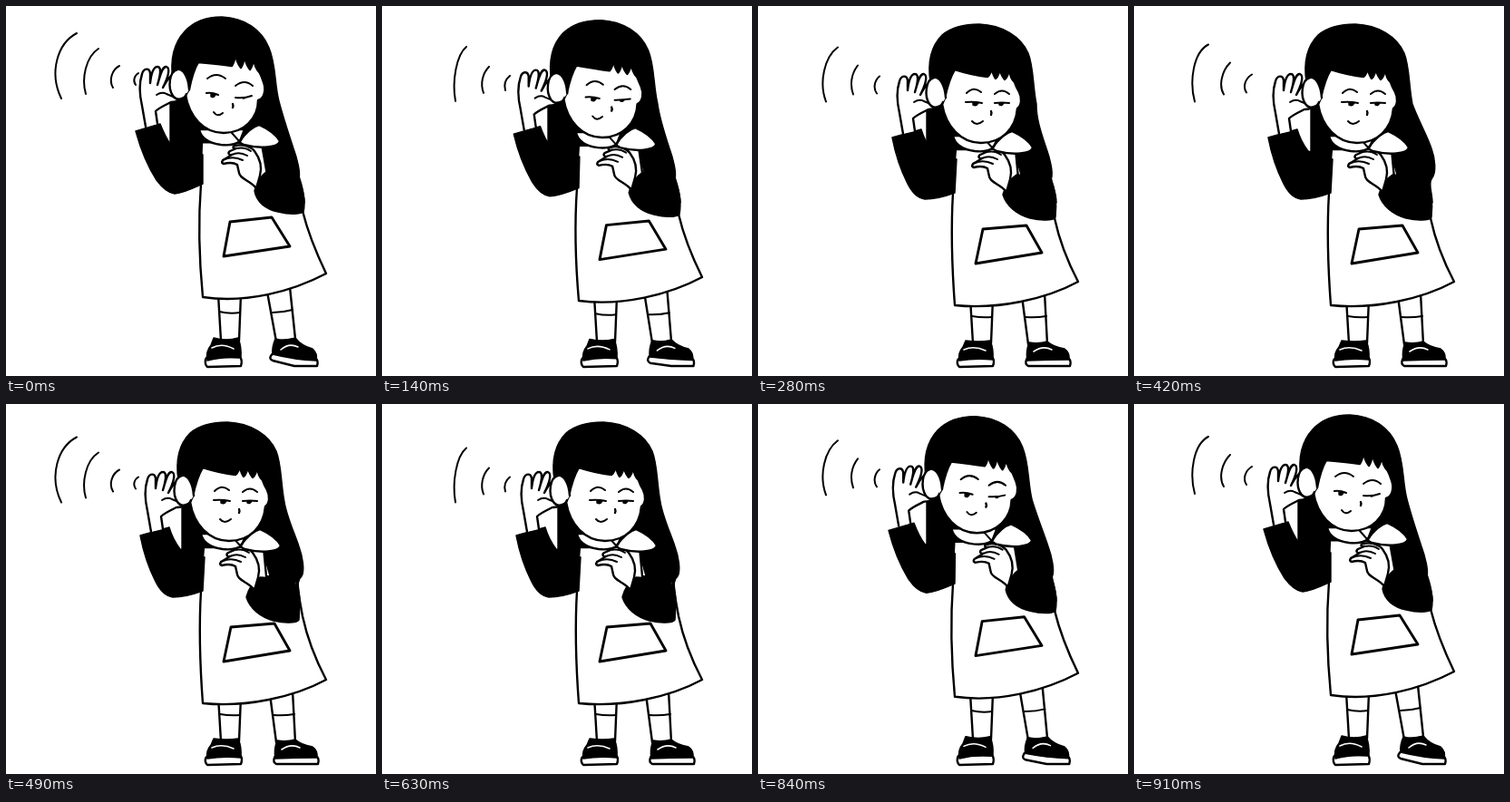
Animation, 408 px wide and 408 px high, one loop 0.98 s. Source, as an HTML page:

```html
<!DOCTYPE html>
<html lang="en">
<head>
<meta charset="utf-8">
<title>Listening girl</title>
<style>
html, body { margin: 0; width: 100%; height: 100%; overflow: hidden; background: #fff; }
svg { display: block; width: 100vw; height: 100vh; }
path { stroke: #000; stroke-width: 2.4; stroke-linecap: round; stroke-linejoin: round; fill: none; }
.black { fill: #000; stroke-width: 1.4; }
.white { fill: #fff; }
.thin { stroke-width: 2; }
.bold { stroke-width: 2.9; }
.shine { stroke: #fff; stroke-width: 1.6; }
</style>
</head>
<body>
<svg id="stage" viewBox="0 0 408 408"></svg>
<script>
const LOOP = 980;

// start ms, crouch 0..1, left hair edge, right hair bulge, right sleeve swing, wave phase
const STEPS = [
  [0, 0, 181, 0, 0, 3],
  [140, .45, 183, 0, 0, 0],
  [210, .75, 184, 0, 0, 0],
  [280, 1, 186, 1, 0, 1],
  [350, 1, 191, 6, 0, 1],
  [420, 1, 195, 11, 0, 2],
  [490, 1, 194, 6, 1, 3],
  [630, 1, 194, 6, 1, 0],
  [770, .45, 191, 6, 0, 1],
  [840, .2, 186, 3, 0, 1],
  [910, 0, 181, 0, 0, 2]
];

const WAVES = [
  'M93,42C82,51 77,80 81,102M118,64C111,71 108,83 112,93M141,74C136,78 134,83 136,90',
  'M88,39C73,50 67,78 75,99M110,59C103,68 101,80 105,91M134,71C128,76 127,85 131,90',
  'M82,36C65,45 61,77 67,99M106,56C97,65 93,81 99,91M130,69C122,74 120,83 124,89',
  'M78,30C57,41 47,73 61,102M102,47C88,56 83,80 88,97M125,66C117,70 113,82 118,90M146,74C141,77 140,83 143,87'
];

// mix two outlines with the same commands
const NUM = /-?\d+(\.\d+)?/g;
function mix(up, down, k) {
  const to = down.match(NUM);
  let i = 0;
  return up.replace(NUM, n => (+n + (to[i++] - n) * k).toFixed(2));
}

// move every point of an absolute outline
function shift(d, dx, dy) {
  let i = 0;
  return d.replace(NUM, n => (+n + (i++ % 2 ? dy : dx)).toFixed(2));
}

const morph = (up, down) => s => mix(up, down, s.k);
const glide = (d, dx, dy) => s => shift(d, dx * s.k, dy * s.k);

const cap = morph(
  'M184,82C181,62 184,42 197,28C208,16 222,12 238,12C263,13 282,26 290,46C298,65 296,86 301,105',
  'M190,84C187,64 190,45 203,32C215,22 230,20 244,20C270,21 290,34 298,52C304,67 303,88 307,108');

function hair(s) {
  const b = s.bulge, x = s.swing * -5;
  return cap(s) + `C${306 + b * .6},124 ${312 + b},142 ${317 + b},157` +
    `C${321 + b},168 ${325 + b * .8},184 ${323 + b * .5},190C${324 + x},196 ${329 + x},205 ${329 + x},217` +
    `L300,222L280,150L215,185L${s.left},168L${s.left},104Z`;
}

const sleeve = morph(
  'M289,181C281,187 275,196 274,204C276,216 286,224 300,227C312,230 324,230 328,227C331,215 327,198 321,182Z',
  'M285,186C277,191 272,200 270,208C274,221 286,230 300,234C312,237 325,237 328,233C330,217 327,200 322,188Z');

const PARTS = [
  ['thin', s => shift(WAVES[s.wave], 0, 6.5 * s.k)],

  // legs
  ['white', morph('M234,318L237,369L257,369L259,318', 'M234,322L237,372L257,372L259,322')],
  ['white', morph('M288,315L298,370L319,367L313,310', 'M291,320L298,373L319,373L316,316')],
  ['thin', morph('M235,337Q247,340 258,338M294,338Q305,338 316,335', 'M236,342Q247,344 258,343M295,343Q306,344 318,342')],

  // shoes
  ['white', morph('M220,390Q221,386 225,387L258,387Q261,391 259,397L222,398Q219,395 220,390Z',
                  'M220,391Q221,388 225,388L259,388Q261,392 259,397L222,398Q219,395 220,391Z')],
  ['black', morph('M229,366Q243,370 256,366Q260,376 259,388Q240,386 222,391Q220,381 226,374Z',
                  'M229,369Q243,371 256,369Q260,378 259,390Q240,388 222,391Q220,383 226,376Z')],
  ['shine', morph('M227,377Q238,371 251,378', 'M227,379Q238,374 251,380')],
  ['white', morph('M292,386Q294,382 298,383L341,388Q345,391 343,397L318,397L294,391Q290,389 292,386Z',
                  'M296,390Q297,387 300,388L342,388Q346,391 344,397L320,397L298,397Q294,395 296,390Z')],
  ['black', morph('M297,367Q308,370 319,366Q326,375 338,378Q344,383 342,391Q318,390 294,384Q293,376 297,367Z',
                  'M299,371Q309,373 319,370Q326,376 338,378Q344,382 343,390Q320,390 297,391Q295,381 299,371Z')],
  ['shine', morph('M303,379Q312,371 322,376', 'M304,381Q314,374 324,379')],

  ['black', hair],

  // apron and pocket
  ['white', morph('M216,150C215,170 215,180 215,196C212,235 213,280 217,321C265,328 315,315 353,295C341,270 333,250 327,226L320,195L288,186L282,152Z',
                  'M218,158C216,178 216,190 215,206C213,240 214,290 217,330C265,335 318,323 353,304C343,285 333,262 327,234L320,195L287,190L284,158Z')],
  ['bold', morph('M247,238L293,233L313,265L240,276Z', 'M248,246L296,242L313,272L240,284Z')],

  // sleeves
  ['black', morph('M143,138L170,130C174,140 178,148 182,153L217,164L217,196C206,201 196,206 186,207C178,206 172,200 166,192C157,178 149,160 143,138Z',
                  'M148,145L180,136C182,143 186,152 192,160L219,169L217,206C206,210 196,213 184,213C176,212 170,206 165,196C158,182 152,166 148,145Z')],
  ['black', s => shift(sleeve(s), -5 * s.swing, 5 * s.swing)],

  // resting hand with fanned fingers
  ['white', glide('M276,201C269,192 258,191 257,184L255,175C250,172 244,173 240,174C237,173 238,170 241,169L249,164C246,165 244,162 247,160L254,157C250,158 249,154 253,154C261,152 270,155 274,160C280,168 283,176 280,187Z', -2, 4)],
  ['thin', glide('M249,164Q257,160 266,165M254,157Q263,155 270,160M241,169Q251,165 261,170', -2, 4)],

  // collar
  ['white', glide('M213,136C215,146 223,151 237,153C246,154 253,153 258,149L263,136Z', 2, 7)],
  ['white', glide('M257,150C264,140 271,133 279,131C290,136 298,142 302,149C300,156 281,158 262,153Z', 1, 7)],
  ['thin', glide('M249,140L258,150L264,139', 1, 7)],

  // hand at the ear
  ['white', glide('M154,133L150,110C147,97 147,84 150,75C152,68 158,68 159,74L159,85C160,76 162,67 167,67C172,67 170,77 167,87C170,77 172,66 177,67C182,69 178,80 173,90C176,85 179,78 183,77L184,94C182,99 185,100 189,102C190,105 187,106 182,106C176,109 169,112 165,116L167,130', 6, 8)],
  ['thin', glide('M166,98Q172,94 177,97L189,102', 6, 8)],

  // face
  ['white', morph('M198,98C202,122 218,140 240,140C262,140 278,124 278,104C285,102 287,92 284,84Q282,78 280,74Q274,68 273,57Q272,66 269,70Q264,64 263,54Q262,64 259,68Q254,62 253,52Q252,62 249,66Q236,64 212,62Q206,72 202,92Z',
                  'M203,108C207,133 224,151 246,151C269,151 284,135 286,113C291,110 291,101 288,95Q285,90 283,84Q278,80 277,69Q276,77 272,81Q267,75 267,67Q266,76 262,80Q258,74 258,66Q257,75 253,78Q236,76 217,70Q210,82 206,102Z')],
  ['white', glide('M202,92C201,77 195,69 189,70C180,72 178,90 184,99C188,105 197,103 199,97', 5, 9)],
  ['thin', morph('M222,80Q232,72 242,80M253,88Q263,80 272,88', 'M230,96Q238,88 246,95M261,97Q269,90 277,97')],
  ['thin', morph('M221,96Q227,95 234,98M253,101Q263,102 271,99', 'M229,106Q238,105 247,107M261,107Q269,106 277,107')],
  ['black', morph('M226,97L231,98Q229,102 226,100ZM260,101L264,101Q262,103 260,101Z', 'M237,107L243,107Q241,111 237,109ZM266,107L271,107Q269,111 266,109Z')],
  ['', morph('M250,108Q251,110 250,112', 'M257,116Q258,118 257,120')],
  ['thin', morph('M229,117Q233,123 239,118', 'M236,127Q241,133 248,127')]
];

const stage = document.getElementById('stage');
const paths = PARTS.map(([kind]) => {
  const p = document.createElementNS('http://www.w3.org/2000/svg', 'path');
  p.setAttribute('class', kind);
  return stage.appendChild(p);
});

let shown;
function draw(now) {
  const t = now % LOOP;
  const step = STEPS.findLast(s => s[0] <= t);
  if (step !== shown) {
    shown = step;
    const [, k, left, bulge, swing, wave] = step;
    PARTS.forEach(([, shape], i) => paths[i].setAttribute('d', shape({ k, left, bulge, swing, wave })));
  }
  requestAnimationFrame(draw);
}
draw(0);
</script>
</body>
</html>
```
